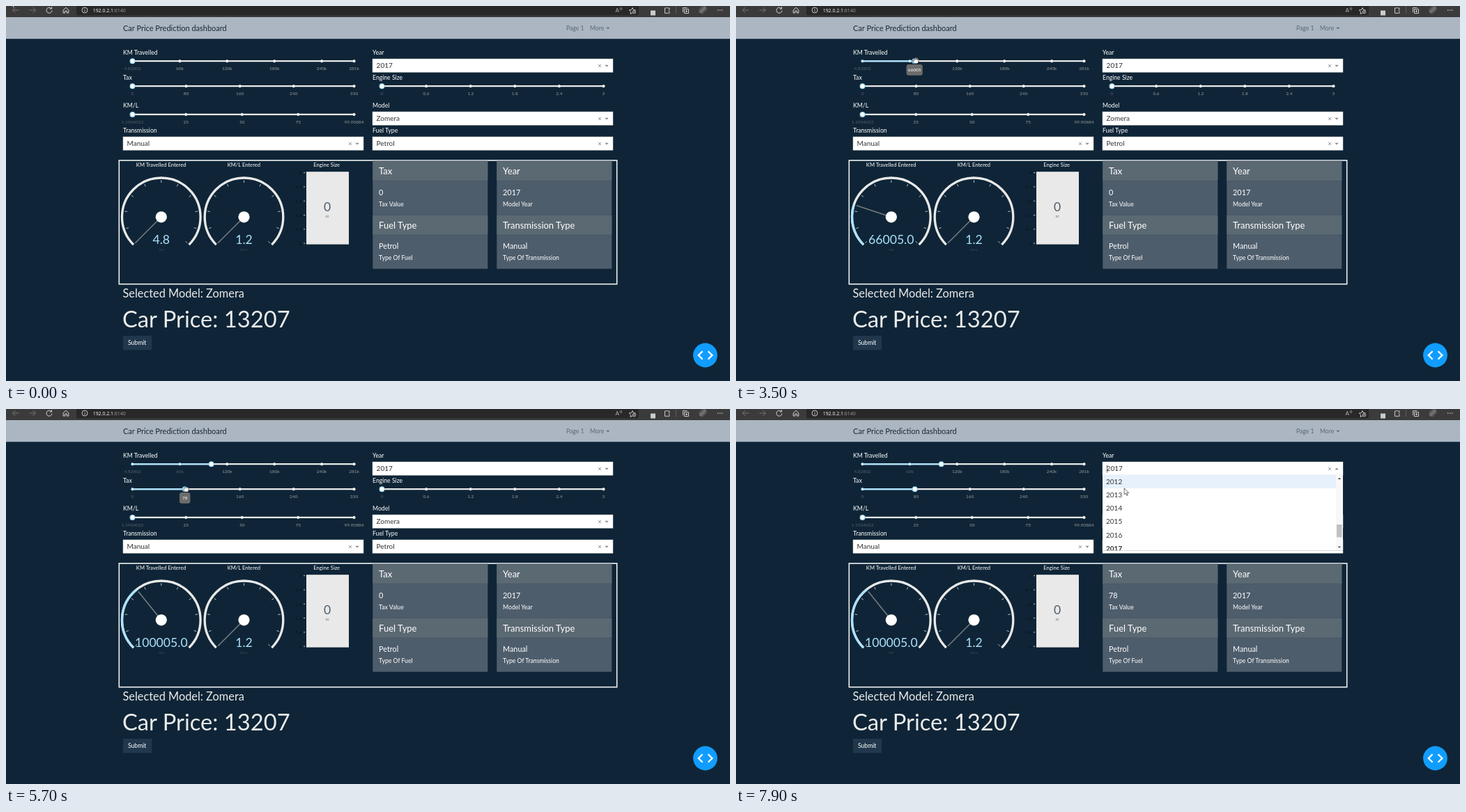
Recreate the animation shown at these times as an HTML page. Size 1039 by 539 pixels, loop 8000 ms.

```html
<!DOCTYPE html>
<html lang="en">
<head>
<meta charset="utf-8">
<title>Car price dashboard</title>
<style>
html, body { margin: 0; width: 100%; height: 100%; overflow: hidden; background: #0f2537; }
svg { display: block; width: 100vw; height: 100vh; font-family: Lato, "Open Sans", sans-serif; }
</style>
</head>
<body>
<svg id="stage" viewBox="0 0 1039 539" xmlns="http://www.w3.org/2000/svg"></svg>
<script>
const LOOP = 8000;
const BLUE = '#abe2fb';
const RAIL = '#e9e9e9';
const stage = document.getElementById('stage');

// Markup helpers
const rect = (x, y, w, h, fill, more = '') =>
  `<rect x="${x}" y="${y}" width="${w}" height="${h}" fill="${fill}" ${more}/>`;
const text = (x, y, size, fill, str, more = '') =>
  `<text x="${x}" y="${y}" font-size="${size}" fill="${fill}" ${more}>${str}</text>`;
const mid = (x, y, size, fill, str, more = '') =>
  text(x, y, size, fill, str, `text-anchor="middle" ${more}`);
const line = (d, stroke, width, more = '') =>
  `<path d="${d}" fill="none" stroke="${stroke}" stroke-width="${width}" ${more}/>`;
const circle = (x, y, r, fill, more = '') =>
  `<circle cx="${x}" cy="${y}" r="${r}" fill="${fill}" ${more}/>`;
const group = (id, body, more = '') => `<g id="${id}" ${more}>${body}</g>`;

function browserBar() {
  const c = '#d6d6d6', dim = '#7c7c7c';
  const arrow = (x, dir, col) => line(`M${x - 4.5 * dir} 6H${x + 4.5 * dir}M${x + .5 * dir} 2l${4 * dir} 4l${-4 * dir} 4`, col, .9);
  return rect(0, 0, 1039, 16, '#3b3b3b')
    + rect(101, -4, 807, 17.5, '#282828', 'rx="3"')
    + arrow(14, -1, dim) + arrow(38, 1, dim)
    + line('M65 3.5A4 4 0 1 0 66 6.5M65.6 1.2V4H62.8', c, 1)
    + line('M82.2 5.8L86 2.2L89.8 5.8V10H87.3V7H84.7V10H82.2Z', c, 1)
    + circle(113, 6, 4, 'none', `stroke="${c}" stroke-width=".9"`)
    + line('M113 5.4V8.4M113 3.6V4.5', c, .9)
    + `<text x="124.7" y="8.6" font-size="6.93" font-family="'Open Sans', 'Noto Sans', sans-serif" fill="#fff">192.0.2.1<tspan fill="#a0a0a0">:6140</tspan></text>`
    + text(874.5, 9.3, 8, '#b5b5b5', 'A') + line('M881 2.5q1.5 1.5 0 3M882.7 1.7q2.2 2.3 0 4.6', '#b5b5b5', .7)
    + line('M899 10l-3 1.4l.6-3.2l-2.4-2.3l3.3-.4l1.5-3l1.5 3l3 .4', c, .9)
    + circle(901.5, 8.6, 2.3, '#282828', `stroke="${c}" stroke-width=".8"`) + line('M900.2 8.6h2.6M901.5 7.3v2.6', c, .6)
    + rect(925, 6.5, 7, 7, '#c9cdcb')
    + line('M945.5 3h2q1-2 2 0h2.5v2.5q-2.2 1 0 2.2v2.6h-6.5z', c, .9)
    + rect(961, 1, .8, 10, '#6a6a6a')
    + line('M971.5 9V2.5h6M973.5 4.5h6v6h-6zM976.5 5.8v3.4M974.8 7.5h3.4', c, .9)
    + circle(1000, 5.5, 6, 'url(#avatar)')
    + [1021.7, 1024.7, 1027.7].map(x => circle(x, 6, .8, c)).join('');
}

function navBar() {
  const ink = '#5c6874';
  return rect(0, 16, 1039, 31.2, '#abb6c2')
    + text(168, 36.3, 11, '#1c2833', 'Car Price Prediction dashboard')
    + text(804, 35.3, 8.6, ink, 'Page 1') + text(838, 35.3, 8.6, ink, 'More')
    + `<path d="M861.4 30.7h5l-2.5 2.6z" fill="${ink}"/>`;
}

const label = (x, y, str) => text(x, y, 8.66, '#fff', str);

const sliders = {
  km: { x: 181.5, y: 79.2, min: 4.82802, max: 281000, marks: [4.82802, 60000, 120000, 180000, 240000, 281000],
        name: v => v < 100 ? v : v / 1000 + 'k' },
  tax: { x: 181.5, y: 115.2, min: 0, max: 330, marks: [0, 80, 160, 240, 330] },
  kml: { x: 181.5, y: 155.9, min: 1.1904032, max: 99.90884, marks: [1.1904032, 25, 50, 75, 99.90884] },
  size: { x: 539.5, y: 115.2, min: 0, max: 3, marks: [0, .6, 1.2, 1.8, 2.4, 3] }
};
const slideX = (s, v) => s.x + 318 * (v - s.min) / (s.max - s.min);

function sliderBody(s, v, tip) {
  const x = slideX(s, v), name = s.name || String;
  let out = rect(s.x - .5, s.y - 1.1, 319, 2.2, RAIL, 'rx="1.1"')
    + rect(s.x, s.y - 1.1, x - s.x, 2.2, BLUE);
  for (const m of s.marks) {
    const on = m <= v, mx = slideX(s, m);
    out += circle(mx, s.y, 1.7, '#fff', `stroke="${on ? '#96dbfa' : RAIL}" stroke-width="1"`)
      + mid(mx, s.y + 13.1, 6.5, on ? '#566069' : '#999', name(m));
  }
  out += circle(x, s.y, 3.4, '#fff', `stroke="${tip ? '#57c5f7' : '#96dbfa'}" stroke-width="1.1"`);
  if (tip) {
    const w = Math.max(15.4, String(v).length * 3.77 + 4.3);
    out += rect(x - w / 2, s.y + 4.9, w, 15.6, '#6c6c6c', 'rx="3.2"')
      + mid(x, s.y + 15, 6.5, '#fff', v);
  }
  return out;
}

const cross = (x, y) => line(`M${x - 2} ${y - 2}l4 4m0-4l-4 4`, '#8c8c8c', .9);
const tri = (x, y, dir) => `<path d="M${x - 2.7} ${y - 1.3 * dir}h5.4l-2.7 ${2.8 * dir}z" fill="#8a8a8a"/>`;

function select(x, y, value) {
  return rect(x, y, 345, 19.2, '#fff', 'stroke="#ccc" stroke-width=".5"')
    + text(x + 5.6, y + 13.2, 10, '#333', value) + cross(x + 326, y + 10) + tri(x + 336, y + 10, 1);
}

function menu() {
  let rows = '';
  for (let i = 0; i < 6; i++) {
    const y = 95 + 19.1 * i;
    rows += rect(526.4, y, 334.6, 19.1, '#e6f1fc', `id="row${i}"`)
      + text(531, y + 13.1, 10, '#333', 2012 + i, i === 5 ? 'font-weight="700"' : '');
  }
  return rect(526, 76, 345, 128, '#fff')
    + rect(526, 203.2, 345, .8, '#ccc') + rect(526.4, 94.6, 344.4, .5, '#e3e3e3')
    + `<g clip-path="url(#menuClip)">${rows}</g>`
    + rect(861, 95, 9.6, 108, '#f8f8f8') + rect(862, 166, 7.6, 18.4, '#c1c1c1')
    + '<path d="M863.7 101h4.4l-2.2-2.6zM863.7 197.4h4.4l-2.2 2.6z" fill="#505050"/>'
    + text(531.6, 89.2, 10, '#333', '2017') + rect(532, 80.5, .7, 11, '#222')
    + cross(852, 86) + tri(862, 86, -1);
}

// Gauges sweep 270 degrees, starting at the lower left
const polar = (cx, r, frac) => {
  const a = (frac * 270 - 135) * Math.PI / 180;
  return [cx + r * Math.sin(a), 303.3 - r * Math.cos(a)].map(n => n.toFixed(2)).join(' ');
};
const arc = (cx, r, frac) =>
  `M${polar(cx, r, 0)}A${r} ${r} 0 ${frac * 270 > 180 ? 1 : 0} 1 ${polar(cx, r, frac)}`;

function gauge(cx, v, min, max, unit) {
  const f = (v - min) / (max - min);
  let ticks = '';
  for (let i = 0; i <= 10; i++) ticks += `M${polar(cx, 49.3, i / 10)}L${polar(cx, 53, i / 10)}`;
  return line(arc(cx, 56.3, 1), RAIL, 3.3)
    + line(arc(cx, 56.3, f), BLUE, 3.3)
    + line(ticks, '#dfe3e6', .8)
    + line(`M${cx} 303.3L${polar(cx, 52.6, f)}`, '#737b81', 1.6)
    + circle(cx, 303.3, 8.1, '#fff')
    + mid(cx, 342.4, 17.6, BLUE, v.toFixed(1))
    + mid(cx, 351.6, 4.3, '#3d4f5e', unit);
}

function tank() {
  let out = rect(431, 238.2, 61, 104.4, RAIL);
  for (let i = 0; i <= 5; i++) {
    const y = 239.6 + 20.3 * i;
    out += rect(427, y - .4, 2.2, .9, '#d5dade')
      + text(424.5, y + 2.4, 6.5, '#07121b', (3 - i * .6).toFixed(i % 5 ? 1 : 0), 'text-anchor="end"');
  }
  return out + mid(461.2, 294.6, 17.6, '#4e5d6c', '0') + mid(461.2, 303.8, 5.4, '#4e5d6c', 'cc');
}

function card(x, y, head, value, note, id = '') {
  return rect(x, y, 165, 77.3, '#4e5d6c') + rect(x, y, 165, 28.5, '#5b6973')
    + line(`M${x} ${y + 28.5}h165M${x} ${y + 77.1}h165`, '#3f4f5f', .5)
    + text(x + 8.8, y + 19.6, 13, '#fff', head)
    + text(x + 8.8, y + 49, 10.83, '#fff', value, id)
    + text(x + 8.8, y + 65, 8.66, '#fff', note);
}

const pointers = {
  arrow: '<path d="M0 0V9.2L2.1 7.3L3.6 10.7L5 10.1L3.5 6.8H6.5Z" fill="#fff" stroke="#111" stroke-width=".6"/>',
  hand: '<path d="M-2.4 4.4L-4.4 .8q-.3-1.2.9-.9l1 1L-3-2.6q.6-1.2 1.4-.1l.5 1.7L-.9-4q.8-1 1.4 0l.2 2.9L1.3-3.6q.9-.9 1.4.2L2.5-.6L3.3-2q1-.5 1.1.4L3.6 2.4L2.6 4.6Z" fill="#fff" stroke="#111" stroke-width=".6"/>',
  fist: '<path d="M-2.2 3.9L-3.6 1.2q-.2-1.5 1-1.4V-2q.6-1.2 1.6-.4q.8-1 1.7-.1q.9-.7 1.6.2q1.4-.3 1.4 1V1.6L2.7 3.9Z" fill="#fff" stroke="#111" stroke-width=".6"/><path d="M-.8-1.8V-.4M.9-1.8V-.4M2.4-1.6V-.4" stroke="#444" stroke-width=".4"/>'
};

// Step keys: each holds until the next one
const kmKeys = [[0, 4.82802], [1100, 5], [1600, 3005], [1700, 8005], [1800, 13005], [1900, 18005], [2000, 24005],
  [2100, 28005], [2300, 33005], [2400, 41005], [2500, 51005], [2600, 60005], [2700, 66005], [3700, 85005], [3800, 100005]];
const taxKeys = [[0, 0], [5300, 36], [5400, 74], [5500, 61], [5700, 78]];
const gaugeKeys = [[0, 4.82802], [2900, 66005], [4000, 100005]];
const tipKeys = [[0, ''], [1100, 'km'], [4200, ''], [4700, 'tax'], [6100, '']];
const pointerKeys = [
  [0, 'arrow', 7, -8], [500, 'arrow', 118, 62], [600, 'arrow', 168, 92.5], [800, 'arrow', 187.5, 81],
  [1100, 'hand', 'km'], [1200, 'fist', 'km'], [2900, 'hand', 'km'], [3700, 'fist', 'km'], [4000, 'hand', 'km'],
  [4200, 'arrow', 261.5, 108], [4300, 'arrow', 226, 112], [4400, 'arrow', 199, 114], [4500, 'arrow', 185.5, 114.5],
  [4700, 'hand', 'tax'], [4800, 'fist', 'tax'], [5900, 'hand', 'tax'],
  [6100, 'arrow', 275, 105], [6200, 'arrow', 330, 80], [6300, 'arrow', 390, 58], [6400, 'arrow', 450, 45],
  [6500, 'arrow', 506, 40.5], [6600, 'arrow', 545, 52], [6700, 'arrow', 557, 70], [6800, 'arrow', 546.8, 79.5],
  [7000, 'arrow', 546.3, 79.3], [7700, 'arrow', 551, 96], [7800, 'arrow', 555, 106], [7900, 'arrow', 557.2, 113.8]
];
const keyAt = (keys, t) => keys.reduce((last, k) => k[0] <= t ? k : last);

stage.innerHTML = `<defs>
  <linearGradient id="avatar" x1="0" y1="0" x2="1" y2="1"><stop offset="0" stop-color="#1d1d1d"/><stop offset=".5" stop-color="#777"/><stop offset="1" stop-color="#161616"/></linearGradient>
  <clipPath id="menuClip"><rect x="526" y="95" width="345" height="108.2"/></clipPath></defs>`
  + rect(0, 0, 1039, 539, '#0f2537') + browserBar() + navBar()
  + label(168, 69.6, 'KM Travelled') + label(168, 105.5, 'Tax')
  + label(168, 145.6, 'KM/L') + label(168, 182, 'Transmission')
  + label(526, 69.6, 'Year') + label(526, 105.5, 'Engine Size')
  + label(526, 145.6, 'Model') + label(526, 182, 'Fuel Type')
  + sliderBody(sliders.kml, sliders.kml.min) + sliderBody(sliders.size, 0)
  + group('tax', '') + group('km', '')
  + select(526, 76, '2017') + select(526, 152, 'Zomera')
  + select(168, 188, 'Manual') + select(526, 188, 'Petrol')
  + rect(162.3, 221.9, 714.4, 177.8, 'none', 'stroke="#f0f2f3" stroke-width="1.6"')
  + mid(222.7, 231.2, 7.62, '#fff', 'KM Travelled Entered')
  + mid(341.4, 231.2, 7.62, '#fff', 'KM/L Entered')
  + mid(460.2, 231.2, 7.62, '#fff', 'Engine Size')
  + group('gauge', '') + gauge(341.5, 1.1904032, 1.1904032, 99.90884, 'KM/L') + tank()
  + card(526.3, 222.7, 'Tax', '0', 'Tax Value', 'id="taxValue"') + card(704.3, 222.7, 'Year', '2017', 'Model Year')
  + card(526.3, 300.4, 'Fuel Type', 'Petrol', 'Type Of Fuel')
  + card(704.3, 300.4, 'Transmission Type', 'Manual', 'Type Of Transmission')
  + text(167.5, 418.8, 16.35, '#ebebeb', 'Selected Model: Zomera')
  + text(167, 461.8, 32.7, '#ebebeb', 'Car Price: 13207')
  + rect(168, 474, 41.2, 20.4, '#20374c') + text(174.9, 487.3, 8.66, '#fff', 'Submit')
  + circle(1003.5, 502, 17.4, '#119dff')
  + line('M999.6 496.3L993.8 502L999.6 507.7M1007.6 496.3L1013.4 502L1007.6 507.7', '#fff', 2.3)
  + group('menu', menu()) + group('pointer', '');

const el = id => document.getElementById(id);

function draw(t) {
  const values = { km: keyAt(kmKeys, t)[1], tax: keyAt(taxKeys, t)[1] };
  const tip = keyAt(tipKeys, t)[1];
  for (const id in values) el(id).innerHTML = sliderBody(sliders[id], values[id], tip === id);
  el('gauge').innerHTML = gauge(222.8, keyAt(gaugeKeys, t)[1], 4.82802, 281000, 'KM');
  el('taxValue').textContent = t < 5900 ? 0 : 78;

  el('menu').style.display = t < 7600 ? 'none' : '';
  const focus = t < 7700 ? 5 : 0;
  for (let i = 0; i < 6; i++) el('row' + i).style.display = i === focus ? '' : 'none';

  let [, shape, x, y] = keyAt(pointerKeys, t);
  if (sliders[x]) {
    const s = sliders[x];
    x = slideX(s, values[x]) + 1.8;
    y = s.y - (shape === 'hand' ? 1 : 0);
  }
  el('pointer').innerHTML = pointers[shape];
  el('pointer').setAttribute('transform', `translate(${x} ${y})`);
}

const start = performance.now();
let shown = -1;
function tick() {
  const step = Math.floor((performance.now() - start) % LOOP / 100);
  if (step !== shown) draw((shown = step) * 100);
  requestAnimationFrame(tick);
}
tick();
</script>
</body>
</html>
```
